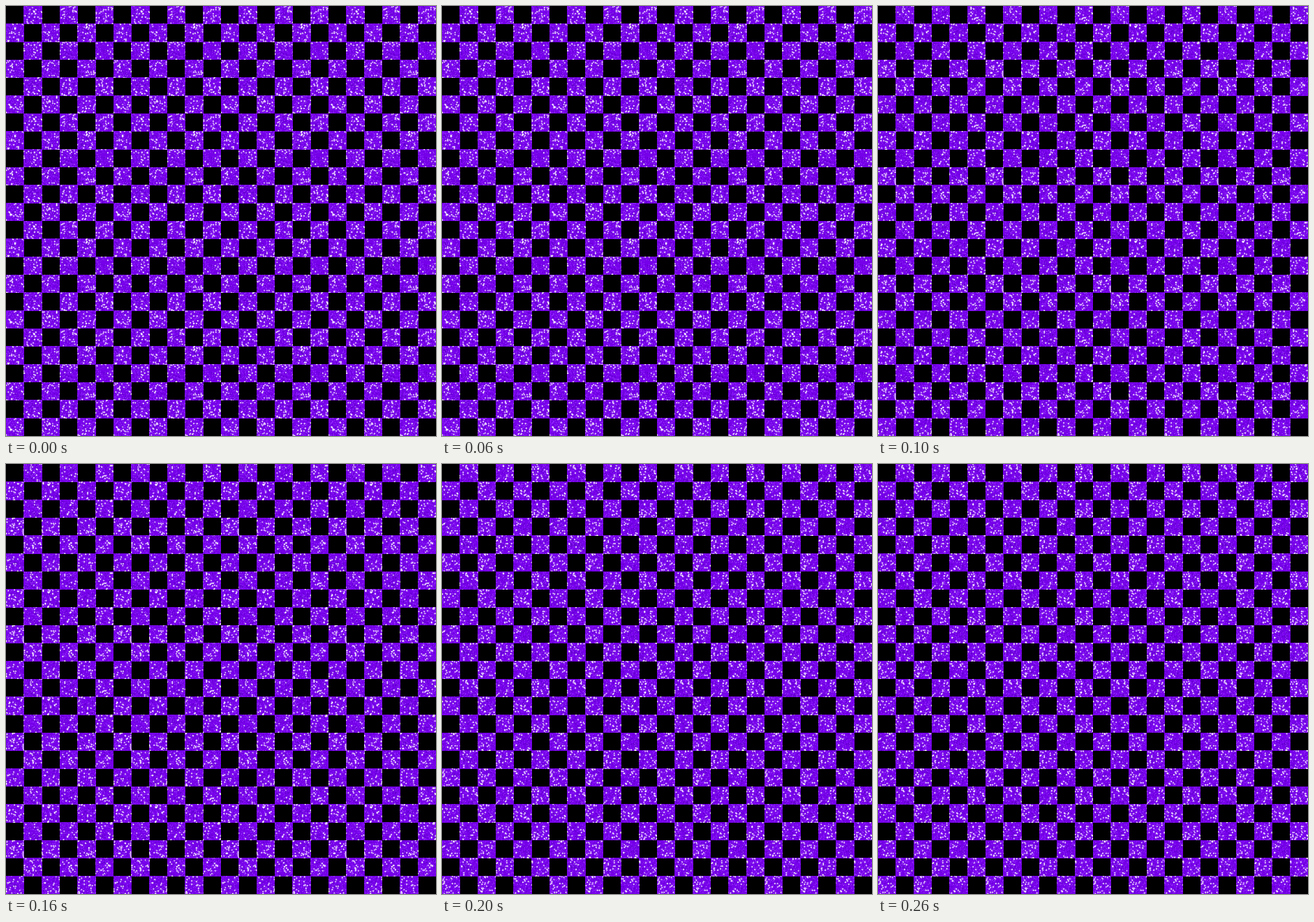
Recreate the animation shown at these times as an HTML page with a canvas. Size 640 px wide and 640 px high, loop 300 ms.

```html
<!DOCTYPE html>
<html lang="en">
<head>
<meta charset="utf-8">
<title>Glitter checkerboard</title>
<style>
  html, body { margin: 0; width: 100%; height: 100%; overflow: hidden; background: #000; }
  canvas { display: block; width: 640px; height: 640px; }
</style>
</head>
<body>
<canvas id="stage" width="640" height="640"></canvas>
<script>
const SIZE = 640, CELLS = 24, TILE = 160, STEP = 100, PHASES = 3;
const ctx = document.getElementById('stage').getContext('2d');

function seeded(seed) {
  return () => {
    seed = (seed + 0x6D2B79F5) | 0;
    let t = Math.imul(seed ^ (seed >>> 15), 1 | seed);
    t = (t + Math.imul(t ^ (t >>> 7), 61 | t)) ^ t;
    return ((t ^ (t >>> 14)) >>> 0) / 4294967296;
  };
}

function makeCanvas(size) {
  const canvas = document.createElement('canvas');
  canvas.width = canvas.height = size;
  return canvas;
}

function makeGlitter(seed) {
  const tile = makeCanvas(TILE);
  const g = tile.getContext('2d');
  const rnd = seeded(seed);

  const scatter = (count, color, minAlpha, maxAlpha, draw) => {
    g.fillStyle = color;
    for (let i = 0; i < count; i++) {
      const alpha = minAlpha + (maxAlpha - minAlpha) * rnd();
      draw(Math.floor(rnd() * TILE), Math.floor(rnd() * TILE), alpha);
    }
    g.globalAlpha = 1;
  };
  const box = (x, y, w, h, alpha) => {
    g.globalAlpha = alpha;
    g.fillRect(x, y, w, h);
  };
  const dot = (x, y, alpha) => box(x, y, 1, 1, alpha);
  const grain = (x, y, alpha) => box(x, y, 2, 2, alpha);
  const sparkle = (x, y, alpha) => {
    box(x - 1, y - 1, 3, 3, alpha * 0.15);
    box(x - 1, y, 3, 1, alpha * 0.45);
    box(x, y - 1, 1, 3, alpha * 0.45);
    dot(x, y, alpha);
  };

  g.fillStyle = '#7600ea';
  g.fillRect(0, 0, TILE, TILE);
  scatter(1700, '#5a00c0', 0.2, 0.6, grain);
  scatter(1500, '#8d1cff', 0.2, 0.7, grain);
  scatter(2000, '#b973ff', 0.25, 0.75, dot);
  scatter(820, '#ffffff', 0.55, 1, sparkle);
  return tile;
}

function makeLayer(seed) {
  const layer = makeCanvas(SIZE);
  const g = layer.getContext('2d');
  g.fillStyle = g.createPattern(makeGlitter(seed), 'repeat');
  g.fillRect(0, 0, SIZE, SIZE);

  // Black squares keep inside whole pixels, so glitter wins shared edges.
  const near = i => Math.ceil(i * SIZE / CELLS);
  const far = i => Math.floor((i + 1) * SIZE / CELLS);
  g.fillStyle = '#000';
  for (let row = 0; row < CELLS; row++) {
    for (let col = row % 2; col < CELLS; col += 2) {
      const x = near(col), y = near(row);
      g.fillRect(x, y, far(col) - x, far(row) - y);
    }
  }
  return layer;
}

const layers = Array.from({ length: PHASES }, (_, i) => makeLayer(41 + i * 977));
const start = performance.now();

function render(now) {
  const phase = Math.floor(Math.max(0, now - start) / STEP) % PHASES;
  ctx.drawImage(layers[phase], 0, 0);
  requestAnimationFrame(render);
}
render(start);
</script>
</body>
</html>
```
